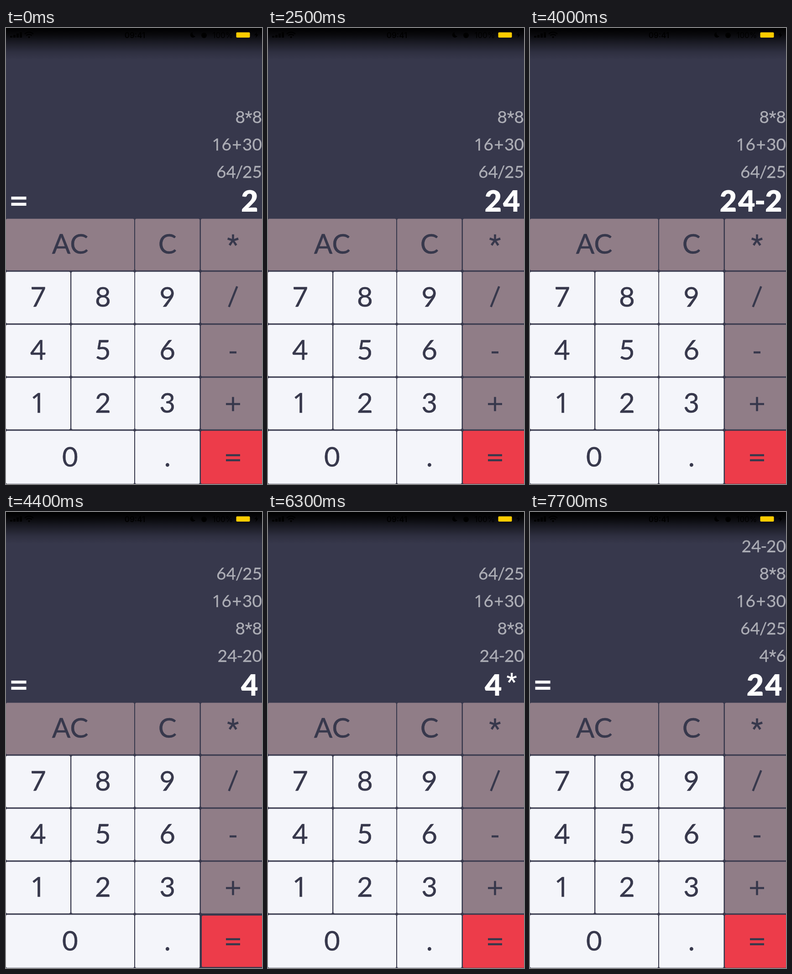
Recreate the animation shown at these times as an HTML page. Size 561 by 998 pixels, loop 8 s.

```html
<!DOCTYPE html>
<html lang="en">
<head>
<meta charset="utf-8">
<title>Calculator</title>
<style>
  html, body { margin: 0; width: 100%; height: 100%; overflow: hidden; background: #37384c; }
  svg { display: block; width: 561px; height: 998px; }
  text { font-family: Lato, sans-serif; text-anchor: middle; }
  .label { font-size: 60px; fill: #37384c; stroke: #37384c; stroke-width: .5; }
  .sign { fill: none; stroke: #37384c; stroke-width: 4.6; }
  .past { font-size: 37px; fill: #adaeb6; stroke: #adaeb6; stroke-width: .3; }
  .entry { font-size: 65px; font-weight: 900; fill: #fff; }
  .one { font-family: "Noto Sans", sans-serif; }
  .star { font-family: Roboto, sans-serif; }
  .entry .star { font-size: 52px; font-weight: 500; }
  .status text { font-family: Inter, sans-serif; font-size: 17px; }
</style>
</head>
<body>
<svg viewBox="0 0 561 998">
  <defs>
    <linearGradient id="shade" x1="0" y1="0" x2="0" y2="1">
      <stop offset="0" stop-opacity="1"/>
      <stop offset=".2" stop-opacity=".85"/>
      <stop offset=".45" stop-opacity=".52"/>
      <stop offset=".75" stop-opacity=".16"/>
      <stop offset="1" stop-opacity="0"/>
    </linearGradient>
  </defs>
  <rect width="561" height="998" fill="#37384c"/>
  <g id="keys"></g>
  <g id="history"></g>
  <path id="equals" d="M11.5 372.3h33M11.5 385.8h33" stroke="#fff" stroke-width="6.4"/>
  <text id="entry" class="entry"></text>
  <rect width="561" height="70" fill="url(#shade)"/>
  <g class="status">
    <path d="M9 17h5v4h-5zM16 15h5v6h-5zM23 12h5v9h-5zM30 9h5v12h-5z"/>
    <path d="M41 13q9.500-8 19 0M44.500 16.500q6-5 12 0" fill="none" stroke="#000" stroke-width="2.500"/>
    <circle cx="50.500" cy="20" r="2"/>
    <text x="282.500" y="21.500" font-weight="600">09:41</text>
    <path d="M409 9a6 6 0 1 0 6 9a7 7 0 0 1-6-9z"/>
    <circle cx="434" cy="16" r="6"/>
    <text x="475" y="21.500">100%</text>
    <rect x="504.500" y="9.500" width="30" height="11.500" rx="2" fill="#fc0"/>
    <path d="M550 9l-6 7h4l-1 6 6-8h-4z"/>
  </g>
</svg>
<script>
const $ = id => document.getElementById(id);
const LOOP = 8000, STEP = 100;
const ROSE = '#907d87', PALE = '#f4f5fa', RED = '#ed3c4a';

// Columns: left edge and width; rows are a fixed pitch apart.
const COLS = [[0, 141], [143.3, 138], [283, 141.500], [427, 141]];
const ROWS = ['A C*', '789/', '456-', '123+', '0 .='];
const SIGNS = {
  '/': 'M-9 20.500L9-24.500',
  '-': 'M-7.500 4h15',
  '+': 'M-15.500 1h31M0-14.500v31',
  '=': 'M-15.500-4.500h31M-15.500 6.500h31'
};

const glyph = (c, attrs = '') =>
  `<tspan ${attrs} class="${{1: 'one', '*': 'star'}[c] || ''}">${c}</tspan>`;

const boxes = {};
function addKey(c, row, col) {
  const [x, w0] = COLS[col], w = c === 'A' || c === '0' ? 281 : w0;
  const y = 417.5 + 116 * row, h = row === 4 ? 116 : 113;
  const cx = x + w / 2, cy = y + h / 2;
  const fill = c === '=' ? RED : row === 0 || col === 3 ? ROSE : PALE;
  const face = SIGNS[c]
    ? `<path class="sign" transform="translate(${cx} ${cy})" d="${SIGNS[c]}"/>`
    : `<text class="label" x="${cx}" y="${cy + 20}">${c === 'A' ? 'AC' : glyph(c)}</text>`;
  $('keys').insertAdjacentHTML('beforeend',
    `<g><rect x="${x}" y="${y}" width="${w}" height="${h}" rx="3" fill="${fill}"/>${face}</g>`);
  boxes[c] = { rect: $('keys').lastElementChild.firstElementChild, cx, cy };
}
ROWS.forEach((line, row) => [...line].forEach((c, col) => c !== ' ' && addKey(c, row, col)));

// Right-aligned run of glyphs, each centred in its advance.
const PAST = { digit: 21.5, '+': 24, '/': 14, '-': 11.5, '*': 15.5, lift: 0 };
const ENTRY = { digit: 40.5, '-': 18.5, '*': 40, lift: 13 };
function run(str, right, y, adv) {
  let x = right;
  return [...str].reverse().map(c => {
    const w = adv[c] || adv.digit;
    x -= w;
    return glyph(c, `x="${x + w / 2}" y="${c === '*' ? y - adv.lift : y}"`);
  }).reverse().join('');
}

const FIRST = ['8*8', '16+30', '64/25'];
const SECOND = ['64/25', '16+30', '8*8', '24-20'];
const THIRD = ['24-20', '8*8', '16+30', '64/25', '4*6'];

// time, key pressed, press length, entry, shows a result, history
const STEPS = [
  [0, '', 0, '2', true, FIRST],
  [1500, '4', 350, '24', false, FIRST],
  [3200, '-', 350, '24-', false, FIRST],
  [3500, '2', 250, '24-2', false, FIRST],
  [4100, '0', 150, '24-20', false, FIRST],
  [4400, '=', 400, '4', true, SECOND],
  [5600, '*', 350, '4*', false, SECOND],
  [6500, '6', 200, '4*6', false, SECOND],
  [6700, '=', 250, '24', true, THIRD]
];

function press(key, amount) {
  const { rect, cx, cy } = boxes[key], s = 1 - .055 * amount;
  rect.setAttribute('transform', `translate(${cx} ${cy}) scale(${s}) translate(${-cx} ${-cy})`);
}

let shown;
function show(step) {
  const [, , , entry, result, history] = step;
  $('entry').innerHTML = run(entry, 554, 402, ENTRY);
  $('equals').style.display = result ? '' : 'none';
  $('history').innerHTML = history.map((s, i) =>
    `<text class="past">${run(s, 561, 328 - 60 * (history.length - 1 - i), PAST)}</text>`).join('');
  shown = step;
}

function draw(ms) {
  const t = Math.floor(ms % LOOP / STEP) * STEP;
  const step = STEPS.filter(s => s[0] <= t).pop();
  if (step !== shown) show(step);
  const down = {};
  for (const [at, key, length] of STEPS) {
    const u = (t - at + 70) / length;
    if (key && t >= at && u < 1) down[key] = Math.sin(Math.PI * u);
  }
  for (const key in boxes) press(key, down[key] || 0);
}

const start = performance.now();
function tick() {
  draw(performance.now() - start);
  requestAnimationFrame(tick);
}
tick();
</script>
</body>
</html>
```
